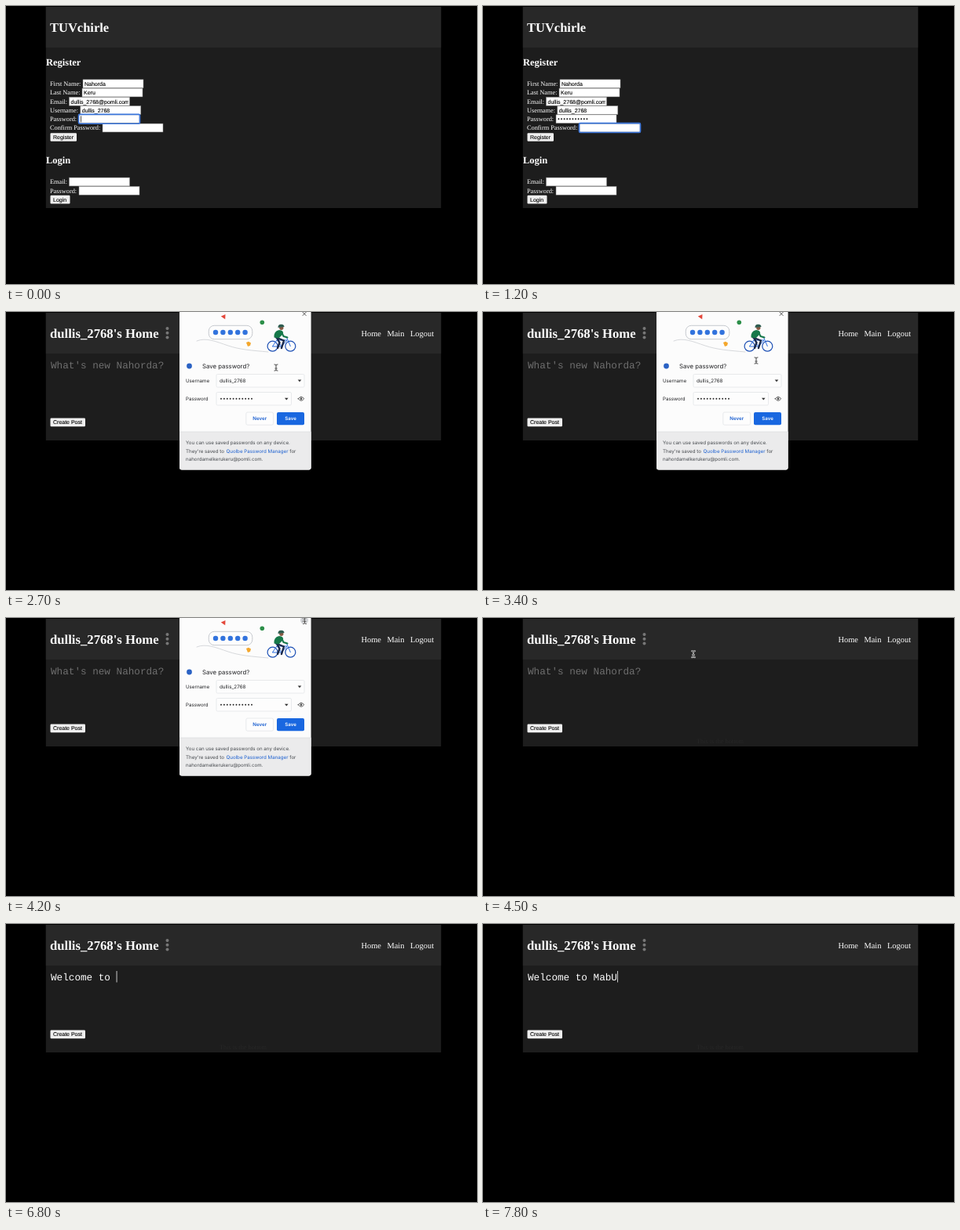
These frames come from a looping animation (600 by 355 pixels, 8 s). An HTML page:

```html
<!DOCTYPE html>
<html lang="en">
<head>
<meta charset="utf-8">
<title>Sign-up demo</title>
<style>
  html, body { margin: 0; height: 100%; overflow: hidden; background: #000; }
  svg { display: block; width: 600px; height: 355px; }
  text { white-space: pre; fill: #fff; font-family: "Liberation Serif", Times, serif; text-rendering: geometricPrecision; }
  .b { font-weight: bold; }
  .sans { font-family: "Liberation Sans", Arial, sans-serif; fill: #000; stroke: #000; stroke-width: .12; }
  .mono { font-family: "Liberation Mono", Courier, monospace; }
  .ui { font-family: Inter, Roboto, sans-serif; fill: #202124; }
  .note { fill: #45494d; }
  .link { fill: #1a5fd0; }
  .mid { text-anchor: middle; }
  .semi { font-weight: 600; }
  .hint { fill: #6e6e6e; }
  .faint { fill: #272727; }
  .w { fill: #fff; }
  .field { fill: #fff; stroke: #858585; stroke-width: .5; }
  .ring { fill: none; stroke: #3b76dc; stroke-width: 1.6; }
  .box { fill: #fdfdfd; stroke: #e3e5e8; stroke-width: .8; }
</style>
</head>
<body>
<svg id="stage" viewBox="0 0 600 355"></svg>
<script>
const USER = 'dullis_2768', FIRST = 'Nahorda', MESSAGE = 'Welcome to MabU';
const W = 77, H = 10.8, ROW = 11.25, CHAR = 7.6;

const text = (x, y, size, str, cls = '', id = '') =>
  `<text x="${x}" y="${y}" font-size="${size}" class="${cls}" id="${id}">${str}</text>`;
const rect = (x, y, w, h, fill, more = '') =>
  `<rect x="${x}" y="${y}" width="${w}" height="${h}" fill="${fill}" ${more}/>`;
const dot = (x, y, r, fill, more = '') => `<circle cx="${x}" cy="${y}" r="${r}" fill="${fill}" ${more}/>`;
const path = (d, fill, stroke = 'none', width = 1) =>
  `<path d="${d}" fill="${fill}" stroke="${stroke}" stroke-width="${width}" stroke-linecap="round" stroke-linejoin="round"/>`;
const group = (id, ...parts) => `<g id="${id}">${parts.join('')}</g>`;
const dots = (n, x, y, step, r, fill) =>
  Array.from({ length: n }, (_, i) => dot(x + i * step, y, r, fill)).join('');

const field = (label, x, y, value = '') =>
  text(56, y + 8.2, 8.3, label) + rect(x, y, W, H, '#fff', 'class="field"') +
  text(x + 2, y + 8.1, 7, value, 'sans');
const button = (y, w, label, id = '') =>
  rect(56.5, y, w, 10.6, '#efefef', `rx="1.2" id="${id}"`) + text(60, y + 7.7, 7, label, 'sans');
const secret = (id, x, y) =>
  group(id + 'Ring', rect(x - .5, y - .5, W + 1, H + 1, 'none', 'class="ring" rx="1.5"')) +
  group(id + 'Dots', dots(11, x + 3.4, y + 5.4, 3.6, .95, '#111')) +
  rect(x + 2, y + 1.5, .8, 8, '#222', `id="${id}Caret"`);
const page = h => rect(50.8, 1, 503.4, h, '#1d1d1d') + rect(50.8, 1, 503.4, 52, '#282828');

const row = i => 93.9 + ROW * i;
const register = group('register', page(257),
  text(56, 33, 16.5, 'TUVchirle', 'b'),
  text(51, 75.5, 12.5, 'Register', 'b'),
  field('First Name:', 98, row(0), FIRST),
  field('Last Name:', 97, row(1), 'Keru'),
  '<clipPath id="clip"><path d="M80 110h75.8v20h-75.8z"/></clipPath>',
  rect(80.5, row(2), W, H, '#fff', 'class="field"'),
  '<g clip-path="url(#clip)">', text(82.5, row(2) + 8.1, 7, USER + '@pomli.com', 'sans'), '</g>',
  text(56, row(2) + 8.2, 8.3, 'Email:'),
  field('Username:', 94.8, row(3), USER),
  field('Password:', 93, row(4)),
  field('Confirm Password:', 123, row(5)),
  secret('pass', 93, row(4)),
  secret('again', 123, row(5)),
  button(162.2, 33.5, 'Register', 'send'),
  text(51, 200.5, 12.5, 'Login', 'b'),
  field('Email:', 80.5, 219.1),
  field('Password:', 93, 230.4),
  button(241.8, 25, 'Login'));

const home = group('home', page(163),
  text(56, 33, 16.7, USER + "'s Home", 'b'),
  [21, 26.7, 32.4].map(y => dot(205.5, y, 2, '#777')).join(''),
  text(452.5, 31, 10.4, 'Home'), text(485.5, 31, 10.4, 'Main'), text(515, 31, 10.4, 'Logout'),
  text(57, 71.5, 12.66, `What's new ${FIRST}?`, 'mono hint', 'hint'),
  text(57, 71.5, 12.66, '', 'mono', 'typed'),
  rect(57, 60, .9, 14.5, '#ddd', 'id="caret"'),
  button(135.6, 44.5, 'Create Post'),
  text(302, 159.5, 8.3, 'This is the bottom', 'mid faint'));

const wheel = x => dot(x, 43.7, 6.5, 'none', 'stroke="#1d50b5" stroke-width="1.2"');
const cyclist = wheel(339.6) + wheel(362.3) +
  path('M339.6 43.7L345 36H358L351 44H339.6M357.5 32.5L362.3 43.7M345 35L351 44', 'none', '#2b6de0') +
  path('M344 32.5L354 36.5L351 46M345 33L348.5 39L346 46', 'none', '#1b2a4a', 2.4) +
  path('M341.5 32.5Q341 24 348 23Q354 23.5 353 28L347.5 33.5Z', '#16784a') +
  path('M351 25.5L353.5 31L358.5 32.5', 'none', '#16784a', 2) +
  dot(350.8, 20.3, 2.6, '#8a5a44') + path('M346.5 20Q346.5 15.5 350.8 15.8Q354.5 16.2 354.5 19Z', '#2f5d50');
const drop = (x, y) => path(`M${x - 2.3} ${y - 1.2}h4.6l-2.3 2.6z`, '#333');

const popup = group('popup',
  rect(221, -6, 167.6, 207.5, '#fcfcfc', 'rx="3"'),
  path('M221 153H388.6V198.5Q388.6 201.5 385.6 201.5H224Q221 201.5 221 198.5Z', '#ebebec'),
  rect(221, 152.6, 167.6, .7, '#d8d9db'),
  path('M243 37C255 32 268 38 283 43S312 49 334 51', 'none', '#cdd0d4', .8),
  rect(258.3, 17.3, 55.5, 17.4, '#fdfdfd', 'rx="7" stroke="#b9bdc3" stroke-width=".8"'),
  dots(5, 267, 26, 9.4, 3.2, '#3273dd'),
  path('M273.8 5.5L279.5 3L279.2 9.3Z', '#e4473a'),
  dot(326.3, 13.3, 2.8, '#2c8f49'),
  path('M306 39L309 37.7L312 39.5L311 43L308 44Z', '#f4a72c'),
  cyclist,
  dot(380, 2.8, 5, '#d3d5d8', 'id="hover"'),
  path('M378 .3L382.2 4.5M382.2 .3L378 4.5', 'none', '#444', .9),
  dot(233.5, 69, 3.4, '#2a62c4'),
  text(250, 72, 7.8, 'Save password?', 'ui'),
  text(229, 90, 6.2, 'Username', 'ui'), text(229, 113, 6.2, 'Password', 'ui'),
  rect(268, 79.5, 112, 16.5, '#fff', 'class="box" rx="1.5"'),
  rect(268, 102.5, 95.5, 16.5, '#fff', 'class="box" rx="1.5"'),
  text(272, 90, 6.3, USER, 'ui'), drop(374, 87.8),
  dots(11, 274, 110.8, 3.9, .95, '#222'), drop(357.3, 111),
  path('M372.3 110.8Q376 105.8 379.7 110.8Q376 115.8 372.3 110.8Z', 'none', '#444', .9), dot(376, 110.8, 1.3, '#444'),
  rect(305.8, 128, 34.8, 16.2, '#fff', 'class="box" rx="2"'),
  text(323.2, 138.2, 6.2, 'Never', 'ui link mid semi'),
  rect(345, 127.9, 35, 16.3, '#1967e0', 'rx="2"'),
  text(362.5, 138.2, 6.2, 'Save', 'ui w mid semi'),
  text(229, 169, 6.2, 'You can use saved passwords on any device.', 'ui note'),
  text(229, 179.5, 6.2, "They're saved to", 'ui note'),
  text(280.5, 179.5, 6.2, 'Quolbe Password Manager<tspan class="note"> for</tspan>', 'ui link'),
  text(229, 190, 6.2, 'nahordamelkerukeru@pomli.com.', 'ui note'));

const beam = 'M-1.9 -4Q0 -4 0 -2.8Q0 -4 1.9 -4M0 -2.8V2.8M-1.9 4Q0 4 0 2.8Q0 4 1.9 4M-1 1H1';
const pointers = group('pointer',
  group('beam', path(beam, 'none', '#ddd', 1.9), path(beam, 'none', '#333', .7)),
  group('arrow', path('M0 0V8L1.9 6.3L3 9L4.2 8.5L3 6H5.6Z', '#111', '#fff', .6)));

const stage = document.getElementById('stage');
stage.innerHTML = register + home + popup + pointers;
const $ = id => document.getElementById(id);
const show = (id, on) => { $(id).style.display = on ? '' : 'none'; };

// Pointer stops: time, x, y, shape
const stops = [
  [1500, 186, 138, 'beam'], [1900, 75, 168, 'arrow'], [2500, 75, 168, 'arrow'],
  [2600, 200, 96, 'beam'], [2700, 344, 71, 'beam'], [3400, 348, 62, 'beam'],
  [4100, 380.5, 3.5, 'beam'], [4200, 380.5, 3.5, 'beam'],
  [4300, 343, 29, 'beam'], [4800, 130, 78, 'beam'], [5800, 130, 78, 'beam']];
const keyTimes = [5800, 6000, 6100, 6200, 6400, 6500, 6500, 6600, 6700, 6700, 6800, 7100, 7300, 7500, 7800];

function movePointer(t) {
  const i = stops.findIndex((s, k) => k < stops.length - 1 && t >= s[0] && t < stops[k + 1][0]);
  show('pointer', i >= 0);
  if (i < 0) return;
  const [t0, x0, y0, shape] = stops[i], [t1, x1, y1] = stops[i + 1];
  const u = (t - t0) / (t1 - t0), e = u * u * (3 - 2 * u);
  $('pointer').setAttribute('transform', `translate(${x0 + (x1 - x0) * e} ${y0 + (y1 - y0) * e})`);
  for (const id of ['beam', 'arrow']) show(id, id === shape);
}

function draw(t) {
  const within = (a, b) => t >= a && t < b;
  show('register', t < 2700);
  show('home', t >= 2700);
  show('popup', within(2700, 4300));
  show('hover', t >= 4100);

  show('passRing', t < 700);
  show('passDots', t >= 400);
  show('passCaret', t < 500);
  $('passCaret').setAttribute('x', t < 400 ? 95 : 135);
  show('againRing', within(700, 2100));
  show('againDots', t >= 1300);
  show('againCaret', within(800, 1000));
  $('send').setAttribute('fill', within(2100, 2200) ? '#cfcfcf' : '#efefef');

  const n = keyTimes.filter(k => k <= t).length;
  show('hint', !n);
  $('typed').textContent = MESSAGE.slice(0, n);
  show('caret', within(4700, 5200) || t >= 5700);
  $('caret').setAttribute('x', 57 + n * CHAR);
  movePointer(t);
}

function tick(now) {
  draw(Math.floor(now % 8000 / 100) * 100);
  requestAnimationFrame(tick);
}
draw(0);
requestAnimationFrame(tick);
</script>
</body>
</html>
```
